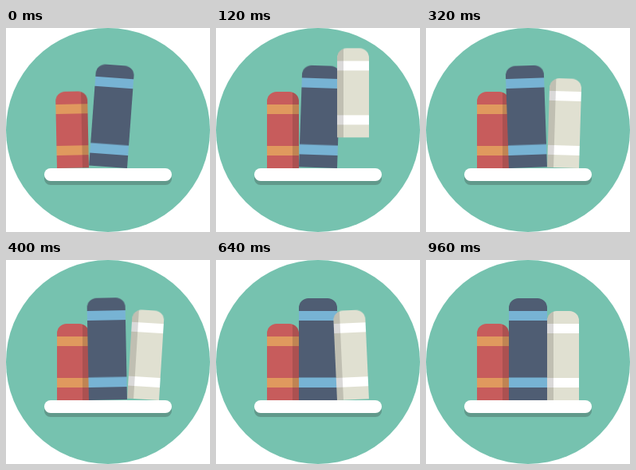
Recreate the animation shown at these times as an HTML page without scripts. Size 256 by 256 pixels, loop 1200 ms.

```html
<!DOCTYPE html>
<html lang="en">
<head>
<meta charset="utf-8">
<title>Bookshelf</title>
<style>
  html, body { margin: 0; width: 100%; height: 100%; overflow: hidden; background: #fff; }
  svg { display: block; width: 100vw; height: 100vh; }

  .book { animation: 1.2s linear infinite; }
  .red { animation-name: nudge; transform-origin: 64px 176px; }
  .blue { animation-name: rock; }
  .beige { animation-name: tip; }
  .drop { animation: drop 1.2s linear infinite; }
  .shade { fill: #231f20; opacity: .17; }

  @keyframes nudge {
    0% { transform: rotate(-1.2deg); }
    8%, 100% { transform: rotate(0deg); }
  }

  /* The pivot swaps from right to left corner as the book passes upright. */
  @keyframes rock {
    0% { transform: rotate(4.2deg); transform-origin: 152px 176px; }
    3.333% { transform: rotate(3.8deg); }
    10% { transform: rotate(2deg); }
    13.33% { transform: rotate(0deg); transform-origin: 152px 176px; }
    13.34% { transform: rotate(0deg); transform-origin: 104px 176px; }
    16.667% { transform: rotate(-1.9deg); }
    21.667% { transform: rotate(-2.4deg); }
    26.667% { transform: rotate(-2deg); }
    40% { transform: rotate(-.3deg); }
    46.667%, 100% { transform: rotate(0deg); transform-origin: 104px 176px; }
  }

  @keyframes drop {
    0% { transform: translateY(-180px); }
    3.333% { transform: translateY(-106px); }
    6.667% { transform: translateY(-65px); }
    10% { transform: translateY(-39px); }
    13.333% { transform: translateY(-25px); }
    16.667% { transform: translateY(-15px); }
    20% { transform: translateY(-7px); }
    23.333%, 100% { transform: translateY(0); }
  }

  @keyframes tip {
    0%, 23.333% { transform: rotate(0deg); transform-origin: 192px 176px; }
    26.667% { transform: rotate(1.7deg); }
    33.333% { transform: rotate(3.5deg); }
    36.667% { transform: rotate(3.9deg); }
    40% { transform: rotate(3.7deg); }
    46.667% { transform: rotate(1.7deg); }
    49.5% { transform: rotate(0deg); transform-origin: 192px 176px; }
    49.51% { transform: rotate(0deg); transform-origin: 152px 176px; }
    53.333% { transform: rotate(-2.6deg); }
    58.333% { transform: rotate(-3deg); }
    63.333% { transform: rotate(-2.3deg); }
    73.333% { transform: rotate(-.7deg); }
    80%, 100% { transform: rotate(0deg); transform-origin: 152px 176px; }
  }
</style>
</head>
<body>
<svg viewBox="0 0 256 256">
  <circle cx="128" cy="128" r="128" fill="#76c2af"/>
  <rect class="shade" x="48" y="181" width="160" height="16" rx="8" style="opacity:.25"/>
  <rect x="48" y="176" width="160" height="16" rx="8" fill="#fff"/>

  <g class="book red">
    <path d="M64 176V92a12 12 0 0 1 12-12h16a12 12 0 0 1 12 12v84z" fill="#c75c5c"/>
    <path d="M64 96h40v12H64zM64 148h40v12H64z" fill="#e0995e"/>
    <path class="shade" d="M96 80.7A12 12 0 0 1 104 92v84h-8z"/>
  </g>

  <g class="book blue">
    <path d="M104 176V60a12 12 0 0 1 12-12h24a12 12 0 0 1 12 12v116z" fill="#4f5d73"/>
    <path d="M104 64h48v12h-48zM104 147.500h48v12.500h-48z" fill="#77b3d4"/>
  </g>

  <g class="drop">
    <g class="book beige">
      <path d="M152 176V76a12 12 0 0 1 12-12h16a12 12 0 0 1 12 12v100z" fill="#e0e0d1"/>
      <path d="M152 80h40v12h-40zM152 148h40v12h-40z" fill="#fff"/>
      <path class="shade" d="M160 64.700A12 12 0 0 0 152 76v100h8z"/>
    </g>
  </g>
</svg>
</body>
</html>
```
